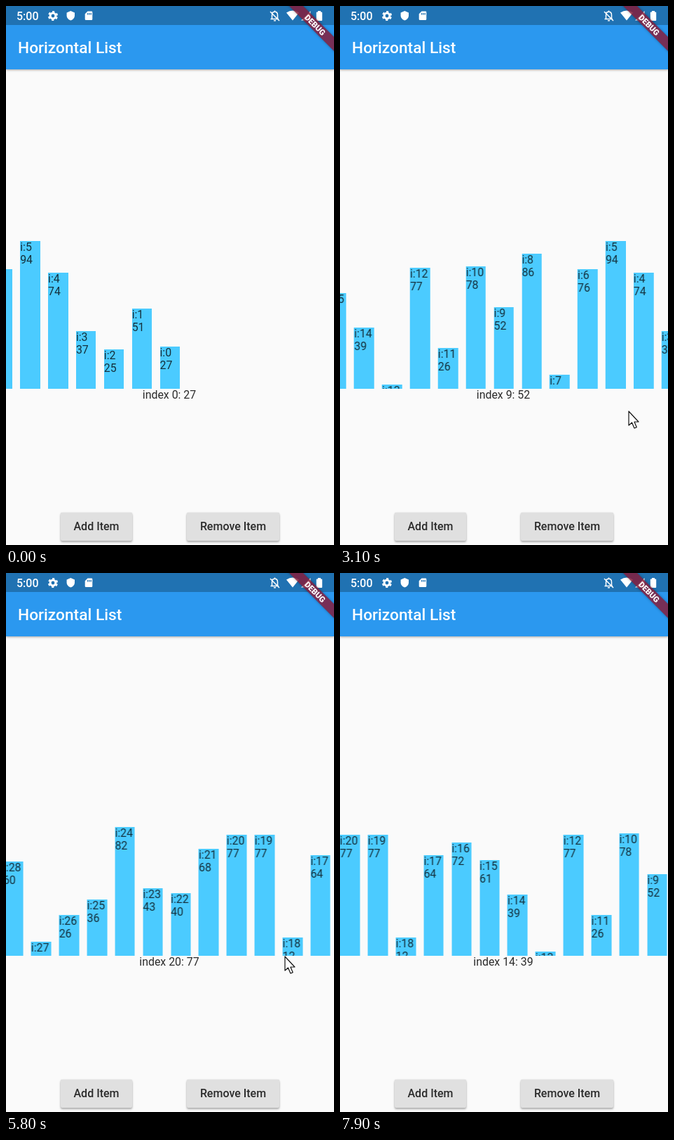
Write an HTML page that moves like this. It is 468 by 766 pixels and loops after 8000 ms.

```html
<!DOCTYPE html>
<html lang="en">
<head>
<meta charset="utf-8">
<title>Horizontal List</title>
<style>
  html, body { margin: 0; width: 100%; height: 100%; overflow: hidden; }
  #stage {
    position: relative; width: 468px; height: 766px; overflow: hidden;
    background: #fafafa; color: #2b2b2b;
    font: 400 15.9px/18px Roboto, "Noto Sans", sans-serif;
  }
  #stage > * { position: absolute; }
  .status { left: 0; top: 0; width: 468px; height: 27px; background: #2072b2; z-index: 1; }
  .appbar {
    left: 0; top: 27px; width: 468px; height: 63px; background: #2b98ef;
    box-shadow: 0 1px 3px rgba(0, 0, 0, .35);
  }
  .clock, .title { color: #fff; font-weight: 500; white-space: nowrap; z-index: 2; }
  .clock { left: 15px; top: 5.5px; font-size: 16px; }
  .title { left: 17px; top: 46px; font-size: 22.7px; line-height: 28px; }
  .icons { left: 0; top: 0; z-index: 2; }
  #list { left: 0; top: 0; will-change: transform; }
  .bar {
    position: absolute; width: 28.5px; overflow: hidden;
    background: #4bcbff; color: #14303c; white-space: pre;
  }
  #label { left: 0; top: 544px; width: 466px; text-align: center; }
  .button {
    top: 720px; height: 40px; line-height: 40px; text-align: center;
    font-size: 16px; font-weight: 500; background: #e0e0e0; border-radius: 2px;
    box-shadow: 0 2px 3px rgba(0, 0, 0, .3), 0 0 2px rgba(0, 0, 0, .14);
  }
  .add { left: 78px; width: 102px; }
  .remove { left: 258px; width: 132px; }
  .debug {
    left: 390.6px; top: 20.4px; width: 100px; height: 14px; z-index: 3;
    transform: rotate(45deg); background: rgba(134, 28, 58, .84); color: #fff;
    font-size: 11.4px; font-weight: 900; line-height: 14px; text-align: center;
    box-shadow: 0 0 4px rgba(0, 0, 0, .35);
  }
  #cursor { left: 0; top: 0; overflow: visible; z-index: 4; }
</style>
</head>
<body>
<div id="stage">
  <div class="status"></div>
  <div class="appbar"></div>
  <div class="clock">5:00</div>
  <div class="title">Horizontal List</div>
  <svg class="icons" width="468" height="28" fill="#fff">
    <g fill="none" stroke="#fff">
      <circle cx="67" cy="14" r="3.9" stroke-width="3"/>
      <circle cx="67" cy="14" r="6" stroke-width="2.2" stroke-dasharray="3.14 3.143" stroke-dashoffset="4.71"/>
    </g>
    <path d="M92.3 7l5.7 2.5v4c0 3.3-2.4 6-5.7 7c-3.3-1-5.7-3.7-5.7-7v-4z"/>
    <path fill-rule="evenodd" d="M116.500 7.500h5.500q1.300 0 1.300 1.300v10q0 1.300-1.300 1.300h-8q-1.300 0-1.300-1.300v-7.500zM116 10v2.600h1.300V10zM118.300 10v2.600h1.300V10zM120.600 10v2.600h1.300V10z"/>
    <path fill="none" stroke="#fff" stroke-width="1.5" d="M379.5 18.5v-5.5c0-3 1.5-4.7 4-4.7s4 1.7 4 4.7v5.5M377.5 18.5h11.5M383.5 6.5v2M377 8l13 13M382 20.7h3"/>
    <path d="M400 9.5Q409 3.5 418 9.5L409 20.5z"/>
    <path d="M421 20.5L434.5 7v13.5z"/>
    <path d="M445 8.5V7h4v1.5h1.2q1 0 1 1v10.5q0 1-1 1h-6.4q-1 0-1-1V9.5q0-1 1-1z"/>
  </svg>
  <div id="list"></div>
  <div id="label"></div>
  <div class="button add">Add Item</div>
  <div class="button remove">Remove Item</div>
  <div class="debug">DEBUG</div>
  <svg id="cursor" width="16" height="26">
    <path d="M0 0V20L4.500 16L8 24L11.200 22.600L8 15H14z" fill="#fff" stroke="#111" stroke-width="1.2" stroke-linejoin="round"/>
  </svg>
</div>
<script>
  const LOOP = 8000, STEP = 100;
  const PITCH = 39.86, HOME = 219.5, BASE = 544.5, UNIT = 2.242;
  const SWIPE = 1100, DRAG = 370, APPROACH = 350, SETTLED = 0.85;

  // The numbers shown on the bars, from index 0
  const values = [27, 51, 25, 37, 74, 94, 76, 9, 86, 52, 78, 26, 77, 3, 39,
                  61, 72, 64, 12, 77, 77, 68, 40, 43, 82, 36, 26, 9, 60, 44];

  // Each swipe carries the list to an index while the pointer drags from grab to drop
  const swipes = [
    { start: 1590, to: 9, grab: [316, 556], drop: [412, 576] },
    { start: 3449, to: 20, grab: [346, 588], drop: [463, 595] },
    { start: 5428, to: 29, grab: [303, 550], drop: [398, 545] },
    { start: 6919, to: 14, grab: [392, 522], drop: [-14.5, 576] }
  ];
  const outside = [480, 540];

  const find = id => document.getElementById(id);
  const list = find("list"), label = find("label"), cursor = find("cursor");
  const clamp = k => Math.min(1, Math.max(0, k));
  const mix = (a, b, k) => a + (b - a) * k;
  const ease = k => k * k * (3 - 2 * k);

  values.forEach((value, i) => {
    const bar = document.createElement("div");
    const height = value * UNIT;
    bar.className = "bar";
    bar.textContent = `i:${i}\n${value}`;
    bar.style.cssText = `left:${HOME - i * PITCH}px;top:${BASE - height}px;height:${height}px`;
    list.append(bar);
  });

  function pose(t) {
    let position = 0, index = 0, point = outside;
    const glide = (target, begin, length) => {
      const k = ease(clamp((t - begin) / length));
      point = point.map((v, i) => mix(v, target[i], k));
    };
    for (const { start, to, grab, drop } of swipes) {
      const k = clamp((t - start) / SWIPE);
      position = mix(position, to, ease(k));
      if (k > SETTLED) index = to;
      glide(grab, start - APPROACH, APPROACH);
      glide(drop, start, DRAG);
    }
    return { position, index, point };
  }

  function draw(now) {
    const { position, index, point } = pose(Math.floor(now % LOOP / STEP) * STEP);
    list.style.transform = `translateX(${position * PITCH}px)`;
    cursor.style.transform = `translate(${point[0]}px, ${point[1]}px)`;
    label.textContent = `index ${index}: ${values[index]}`;
  }

  const begin = performance.now();
  function tick() {
    draw(performance.now() - begin);
    requestAnimationFrame(tick);
  }
  tick();
</script>
</body>
</html>
```
